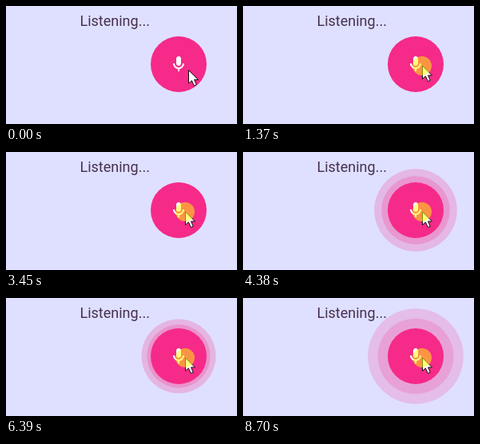
Recreate the animation shown at these times as an HTML page with a canvas. Size 289 px wide and 148 px high, loop 8.78 s.

```html
<!DOCTYPE html>
<html lang="en">
<head>
<meta charset="utf-8">
<title>Listening</title>
<style>
  html, body { margin: 0; height: 100%; overflow: hidden; background: #dfe0ff; }
  canvas { display: block; }
</style>
</head>
<body>
<canvas width="289" height="148"></canvas>
<script>
const ctx = document.querySelector('canvas').getContext('2d');

const LOOP = 8780, PULSE = 2080, FIRST_PULSE = 55, STEP = 76.4;
const GLOW_TIME = 2000, GLOW_LEAD = 730; // glow is hidden behind the button during the lead
const END_RADIUS = 75, CENTER = [216, 73];
const PINK = '#f62a88';

const mic = new Path2D('M12 14c1.66 0 3-1.34 3-3V5c0-1.66-1.34-3-3-3S9 3.34 9 5v6c0 1.66 1.34 3 3 3z' +
  'm5-3c0 2.76-2.24 5-5 5s-5-2.24-5-5H5c0 3.53 2.61 6.43 6 6.92V21h2v-3.08c3.39-.49 6-3.39 6-6.92h-2z');
const arrow = new Path2D('M0 0V16.5L3.9 13 6.8 19.5 9.8 18.2 7 12H12Z');

// cubic-bezier(.4, 0, .2, 1), solved by bisection
function fastOutSlowIn(x) {
  let lo = 0, hi = 1;
  for (let i = 0; i < 24; i++) {
    const s = (lo + hi) / 2, u = 1 - s;
    if (1.2 * s * u * u + 0.6 * s * s * u + s ** 3 < x) lo = s;
    else hi = s;
  }
  return lo * lo * (3 - 2 * lo);
}

function disc([x, y], radius, color, alpha = 1) {
  ctx.globalAlpha = alpha;
  ctx.fillStyle = color;
  ctx.beginPath();
  ctx.arc(x, y, radius, 0, 2 * Math.PI);
  ctx.fill();
  ctx.globalAlpha = 1;
}

function label(color) {
  ctx.fillStyle = color;
  ctx.font = '18px Roboto, sans-serif';
  ctx.fillText('Listening...', 92.5, 25);
}

function glow(time) {
  const step = Math.floor((time % PULSE) / STEP);
  const progress = (GLOW_LEAD + step * STEP) / GLOW_TIME;
  if (progress >= 1) return;
  const eased = fastOutSlowIn(progress);
  const radius = END_RADIUS * eased;
  const alpha = 0.4 * (1 - progress);
  if (step < 10) disc(CENTER, radius, PINK, alpha);
  if (step < 11) disc(CENTER, END_RADIUS * (1 / 6 + eased * 7 / 12), PINK, alpha);

  // the label turns pink where the glow covers it
  ctx.save();
  ctx.beginPath();
  ctx.arc(...CENTER, radius, 0, 2 * Math.PI);
  ctx.clip();
  ctx.globalAlpha = Math.min(1, 3 * (1 - progress));
  label('#d63a92');
  ctx.restore();
}

function drawAt(x, y, path, fill, stroke) {
  ctx.save();
  ctx.translate(x, y);
  ctx.fillStyle = fill;
  ctx.fill(path);
  if (stroke) {
    ctx.strokeStyle = stroke;
    ctx.stroke(path);
  }
  ctx.restore();
}

function draw(now) {
  const time = now % LOOP;
  const pressed = time >= 60;
  const pointer = pressed ? [224.5, 75] : [228.5, 80.5];

  ctx.fillStyle = '#dfe0ff';
  ctx.fillRect(0, 0, 289, 148);
  label('#47304f');
  if (pressed) glow(time - FIRST_PULSE);
  disc(CENTER, 35, PINK);
  drawAt(204, 61, mic, '#fff');
  drawAt(...pointer, arrow, '#fff', '#111');
  if (pressed) disc([224, 75], 12, '#ff0', 0.5);
  requestAnimationFrame(() => draw(performance.now()));
}
draw(performance.now());
</script>
</body>
</html>
```
